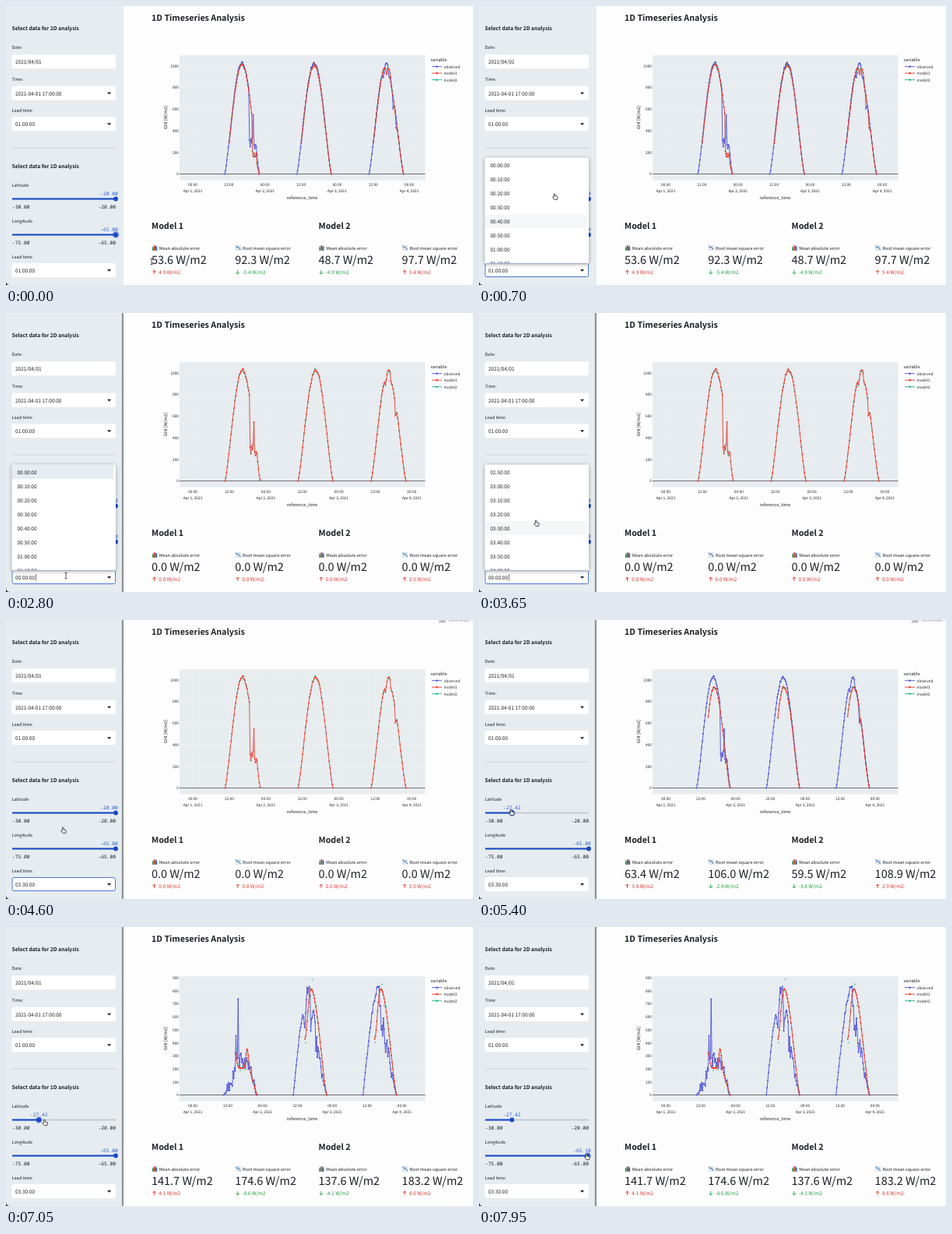
An HTML page with a canvas that plays this animation: 600 by 358 pixels, repeating every 8000 ms.

```html
<!DOCTYPE html>
<html lang="en">
<head>
<meta charset="utf-8">
<title>1D Timeseries Analysis</title>
<style>
html, body { margin: 0; width: 100%; height: 100%; overflow: hidden; background: #fdfdfd; }
canvas { display: block; width: 600px; height: 358px; }
</style>
</head>
<body>
<canvas></canvas>
<script>
const LOOP = 8000;
const INK = '#1c1e28', PANEL = '#e6ecef', BLUE = '#1848c8', PAGE = '#fdfdfd';
const RED = '#d9342a', GREEN = '#1d9e40';
const OBSERVED = '#4c51d8', MODEL1 = '#e8392b', MODEL2 = '#1fb18a';
const SANS = '"Noto Sans CJK JP", "Noto Sans CJK SC", "Noto Sans CJK", "Open Sans", sans-serif';
const MONO = '"Noto Sans Mono", "DejaVu Sans Mono", monospace';
const EM = 0.402; // page zoom, corrected for the font's larger latin glyphs

const canvas = document.querySelector('canvas');
const ctx = canvas.getContext('2d');
const ratio = window.devicePixelRatio || 1;
canvas.width = 600 * ratio;
canvas.height = 358 * ratio;
ctx.textRendering = 'geometricPrecision';

// ---------- drawing helpers ----------
function text(str, x, y, size = 14, { color = INK, align = 'left', weight = 400, mono = false } = {}) {
  ctx.font = `${weight} ${size * (mono ? 0.449 : EM)}px ${mono ? MONO : SANS}`;
  ctx.fillStyle = color;
  ctx.textAlign = align;
  ctx.fillText(str, x, y);
}
function rect(x, y, w, h, fill) {
  ctx.fillStyle = fill;
  ctx.fillRect(x, y, w, h);
}
function roundRect(x, y, w, h, r, fill) {
  ctx.beginPath();
  ctx.roundRect(x, y, w, h, r);
  ctx.fillStyle = fill;
  ctx.fill();
}
function circle(x, y, r, fill) {
  ctx.beginPath();
  ctx.arc(x, y, r, 0, 7);
  ctx.fillStyle = fill;
  ctx.fill();
}
function polyline(points, color, width = 0.9) {
  ctx.beginPath();
  points.forEach(([x, y]) => ctx.lineTo(x, y));
  ctx.strokeStyle = color;
  ctx.lineWidth = width;
  ctx.lineJoin = 'round';
  ctx.stroke();
}
const clamp01 = p => Math.min(1, Math.max(0, p));

// ---------- irradiance by day (0 to 2) and hour ----------
const SUNRISE = 10.6, DAY = 11.5, STEP = 0.25;

const sun = h => Math.sin(Math.PI * clamp01((h - SUNRISE) / DAY));
const bump = (h, center, width) => Math.exp(-(((h - center) / width) ** 2));
// Seeded noise between -0.5 and 0.5, one value per time step.
function noise(day, h) {
  const s = Math.sin((Math.round(h / STEP) + day * 99) * 127.1) * 43758.5;
  return s - Math.floor(s) - 0.5;
}

const clearSky = h => 1022 * sun(h) ** 1.3;

function sunnyObserved(day, h) {
  const n = noise(day, h);
  if (day === 0 && h > 18.7) {
    const broken = 275 + 160 * n + 200 * bump(h, 20.1, 0.15);
    return Math.min(broken, 1.3 * clearSky(h) + 10);
  }
  let factor = 1 + 0.025 * n;
  if (day === 2) {
    factor -= 0.09 * bump(h, 15.4, 0.5) * (0.6 + n) + 0.25 * bump(h, 18.7, 0.15);
    if (h > 17) factor -= 0.07;
  }
  return clearSky(h) * factor;
}

// Persistence forecast: the clearness seen one lead time earlier.
const forecast = lead => (day, h) => {
  if (!lead) return sunnyObserved(day, h);
  const clearness = Math.min(1.05, sunnyObserved(day, h - lead) / Math.max(1, clearSky(h - lead)));
  const spinUp = 0.06 * lead * Math.exp((SUNRISE + lead + 0.5 - h) / 1.2);
  return clearSky(h) * clearness * (1 - spinUp - 0.013 * lead);
};

function cloudyObserved(day, h) {
  const n = noise(day, h);
  if (day === 0) {
    const flashes = 260 * bump(h, 14.85, 0.15) + 500 * bump(h, 15.6, 0.15);
    return (270 * bump(h, 17.2, 4) + 120 * n + flashes) * clamp01(clearSky(h) / 250);
  }
  const gaps = h > 16.1 ? (0.8 + 0.45 * n) * (1 - 0.1 * (h - 16)) : 0.99 + 0.08 * n;
  const dip = day === 1 ? 0.28 * bump(h, 14.5, 0.4) : 0;
  return 835 * sun(h) * (gaps - dip);
}

function cloudyModel(day, h) {
  if (day === 0)
    return (205 + 120 * bump(h, 14.6, 0.7) + 150 * bump(h, 18.7, 0.6)) * clamp01((22 - h) / 2.6);
  return 830 * sun(h) ** 1.3 * (1 - 0.4 * bump(h, 14.7, 1.1));
}

function result(lead, hourWidth, metrics, cloudy = false) {
  return {
    hourWidth, metrics,
    hideObserved: lead === 0,
    start: lead ? SUNRISE + lead + 0.5 : SUNRISE,
    unit: cloudy ? 0.1672 : 0.1389,
    tick: cloudy ? 100 : 200,
    ticks: cloudy ? 9 : 5,
    observed: cloudy ? cloudyObserved : sunnyObserved,
    model: cloudy ? cloudyModel : forecast(lead),
    spread: cloudy ? 0.3 : 0.03
  };
}
const RESULTS = [
  [0, result(1, 3.8625, [[53.6, 4.9], [92.3, -5.4], [48.7, -4.9], [97.7, 5.4]])],
  [2300, result(0, 3.908, [[0, 0], [0, 0], [0, 0], [0, 0]])],
  [5000, result(3.5, 3.733, [[63.4, 3.8], [106, -2.9], [59.5, -3.8], [108.9, 2.9]])],
  [6950, result(3.5, 3.733, [[141.7, 4.1], [174.6, -8.6], [137.6, -4.1], [183.2, 8.6]], true)]
];
const RUNS = [[1000, 2300], [3950, 5000], [5250, 6950]];

// ---------- main column ----------
function drawChart(r) {
  const X0 = 240, Y0 = 215.5, TOP = 63.3, HEIGHT = 160.2;
  const toX = (day, h) => X0 + (day * 24 + h) * r.hourWidth;
  const toY = value => Y0 - Math.max(0, value) * r.unit;

  rect(223, TOP, 315.5, HEIGHT, PANEL);
  for (let i = 0; i <= r.ticks; i++) {
    const y = toY(i * r.tick);
    rect(223, y - 0.25, 315.5, 0.5, '#eee');
    text(i * r.tick, 222, y + 1.9, 12, { align: 'right' });
  }
  for (let i = 0; i < 7; i++) {
    const x = toX(0, i * 12);
    rect(x - 0.25, TOP, 0.5, HEIGHT, '#eee');
    text(i % 2 ? '12:00' : '00:00', x, 230.8, 12, { align: 'center' });
    if (i % 2 === 0) text(`Apr ${i / 2 + 1}, 2021`, x, 238.7, 12, { align: 'center' });
  }
  rect(223, Y0 - 0.4, 315.5, 0.8, '#5a4a55');

  const plot = (value, start, color) => {
    for (let day = 0; day < 3; day++) {
      const points = [];
      for (let h = start; h < 22.2; h += STEP) points.push([toX(day, h), toY(value(day, h))]);
      polyline(points, color);
      points.forEach(([x, y]) => circle(x, y, 1, color));
    }
  };
  if (!r.hideObserved) plot(r.observed, SUNRISE, OBSERVED);
  plot(r.model, r.start, MODEL1);
  for (let day = 0; day < 3; day++)
    for (let h = r.start + STEP; h < 22; h += 3 * STEP)
      circle(toX(day, h), toY(r.model(day, h) * (1 + r.spread * noise(day, h + 50))), 0.8, MODEL2);

  text('reference_time', 380.5, 247.5, 14, { align: 'center' });
  ctx.save();
  ctx.translate(206.5, 143);
  ctx.rotate(-Math.PI / 2);
  text('GHI [W/m2]', 0, 0, 14, { align: 'center' });
  ctx.restore();

  text('variable', 545.5, 71.3, 14);
  [['observed', OBSERVED], ['model1', MODEL1], ['model2', MODEL2]].forEach(([name, color], i) => {
    const y = 77.7 + i * 8.5;
    polyline([[547, y], [560, y]], color);
    circle(553.5, y, 1.2, color);
    text(name, 562.5, y + 1.9, 12);
  });
}

function drawIcon(x, falling) {
  rect(x, 306.8, 7, 7, '#dbe5ec');
  if (falling) {
    polyline([[x + 0.5, 307.5], [x + 2.3, 310], [x + 3.6, 309], [x + 6.7, 313]], '#2f6fb5', 1);
    return;
  }
  rect(x + 0.5, 309.3, 1.8, 4.5, '#2f9141');
  rect(x + 2.6, 307.3, 1.8, 6.5, '#d0352b');
  rect(x + 4.7, 308.5, 1.8, 5.3, '#1f5fb5');
}

function drawMetric(x, [value, delta], isRms) {
  drawIcon(x + 0.5, isRms);
  text(isRms ? 'Root mean square error' : 'Mean absolute error', x + 9.8, 312.7);
  text(`${value.toFixed(1)} W/m2`, x, 331.2, 36);
  const color = delta < 0 ? GREEN : RED;
  const dir = delta < 0 ? 1 : -1, tip = 341.5 + dir * 2.5;
  polyline([[x + 3.5, 341.5 - dir * 2.5], [x + 3.5, tip]], color);
  polyline([[x + 1.2, tip - dir * 2.3], [x + 3.5, tip], [x + 5.8, tip - dir * 2.3]], color);
  text(`${delta.toFixed(1)} W/m2`, x + 9.3, 344, 16, { color });
}

function drawRunning(t) {
  for (let i = 0; i < 3; i++) {
    const shift = Math.sin(t / 120 + i);
    polyline([[555.5 + shift, i * 1.6 - 0.3], [564 + shift, i * 1.6 - 0.3]], '#777', 0.7);
  }
  text('RUNNING...', 569, 2, 14, { color: '#8a8c93' });
}

function drawMain(t) {
  const [, current] = RESULTS.filter(([at]) => at <= t).pop();
  const heading = (str, x, y) => text(str, x, y, 26.7, { weight: 600 });
  rect(151, 0, 449, 358, PAGE);
  heading('1D Timeseries Analysis', 187, 18.6);
  drawChart(current);
  heading('Model 1', 187, 286);
  heading('Model 2', 401.5, 286);
  current.metrics.forEach((m, i) => drawMetric(187 + i * 107.2, m, i % 2 === 1));

  const run = RUNS.find(([from, to]) => t >= from && t < to);
  if (!run) return;
  // Stale content fades out after half a second.
  ctx.globalAlpha = 0.67 * clamp01((t - run[0] - 500) / 1000) ** 1.7;
  rect(151, 0, 449, 358, PAGE);
  ctx.globalAlpha = 1;
  if (t > run[0] + 100) drawRunning(t);
}

// ---------- sidebar ----------
function drawField(y, value, { arrow = true, focus = false } = {}) {
  roundRect(7.5, y, 133.5, 18, 2, '#fff');
  if (focus) {
    ctx.beginPath();
    ctx.roundRect(8, y + 0.5, 132.5, 17, 2);
    ctx.strokeStyle = '#4a78cf';
    ctx.lineWidth = 1;
    ctx.stroke();
  }
  text(value, 12, y + 11.9, 16);
  if (!arrow) return;
  ctx.beginPath();
  ctx.moveTo(130, y + 8);
  ctx.lineTo(135.2, y + 8);
  ctx.lineTo(132.6, y + 10.8);
  ctx.fillStyle = INK;
  ctx.fill();
}

function drawSlider(y, label, min, max, value, active) {
  const x = 8 + 133 * (value - min) / (max - min);
  text(label, 7.5, y - 15.3);
  rect(8, y - 1, 133, 2, '#c3cdd6');
  rect(8, y - 1, x - 8, 2, BLUE);
  if (active) circle(x, y, 4.3, 'rgba(24,72,200,.45)');
  circle(x, y, 2.9, BLUE);
  const mono = { mono: true };
  text(value.toFixed(2), Math.min(x, 132.5), y - 5, 14, { ...mono, color: '#2a5ccb', align: 'center' });
  text(min.toFixed(2), 8, y + 12.8, 14, mono);
  text(max.toFixed(2), 141, y + 12.8, 14, { ...mono, align: 'right' });
}

const leadLabel = i => `0${Math.floor(i / 6)}:${i % 6}0:00`;

function drawMenu(t, scroll) {
  ctx.save();
  ctx.shadowColor = 'rgba(0,0,0,.35)';
  ctx.shadowBlur = 5;
  ctx.shadowOffsetY = 1;
  roundRect(7.5, 194.5, 133.5, 136, 2, '#fff');
  ctx.restore();
  ctx.save();
  ctx.beginPath();
  ctx.rect(7.5, 194.5, 133.5, 135.5);
  ctx.clip();
  const { y } = pointerAt(t - 110);
  const hover = y > 195 && y < 330 ? Math.floor((y - 195 + scroll) / 18) : -1;
  for (let i = 0; i < 30; i++) {
    const top = 195 + i * 18 - scroll;
    if (i === hover) rect(7.5, top, 131, 18, '#f4f6f7');
    if (i === 0 && t > 2000) rect(7.5, top, 131, 18, PANEL);
    text(leadLabel(i), 14.5, top + 11.6, 16);
  }
  ctx.restore();
}

function drawSidebar(t) {
  const heading = (str, y) => text(str, 7.5, y, 16.7, { weight: 600 });
  rect(0, 0, 151, 358, PANEL);
  if (t >= 1000) rect(148.8, 0, 2.2, 358, '#8f9399');
  heading('Select data for 2D analysis', 31.2);
  text('Date:', 7.5, 55.2);
  drawField(62.3, '2021/04/01', { arrow: false });
  text('Time:', 7.5, 96);
  drawField(102.7, '2021-04-01 17:00:00');
  text('Lead time:', 7.5, 135.5);
  drawField(142.2, '01:00:00');
  rect(8, 181.6, 133, 0.8, '#c9cfd5');
  heading('Select data for 1D analysis', 207.8);
  drawSlider(247.5, 'Latitude', -30, -20, t < 5200 ? -20 : -27.42, t >= 5150 && t < 7100);
  drawSlider(293.5, 'Longitude', -75, -65, t < 7750 ? -65 : -65.1, t < 250 || t >= 7600);
  text('Lead time:', 7.5, 323.5);
  const lead = t < 1000 ? 6 : t < 3950 ? 0 : 21;
  drawField(330, leadLabel(lead), { focus: t >= 300 && t < 5200 });

  const firstOpen = t >= 350 && t < 1000, secondOpen = t >= 2700 && t < 3950;
  if (!firstOpen && !secondOpen) return;
  if (secondOpen && t % 1000 > 500) rect(38.2, 335, 0.6, 8.5, INK);
  const p = clamp01((t - 3100) / 600);
  drawMenu(t, 312 * p * p * (3 - 2 * p));
}

// ---------- pointer: stops as arrival, departure, place and shape ----------
const STOPS = [
  [0, 50, 187, 328, 'beam'],
  [350, 350, 77, 339, 'beam'],
  [700, 700, 98, 245, 'hand'],
  [920, 1020, 60, 205, 'hand'],
  [1650, 2200, 85, 304, 'arrow'],
  [2600, 2850, 77, 337, 'beam'],
  [3080, 4650, 74, 270, 'hand'],
  [5150, 7000, 42, 247, 'hand'],
  [7600, LOOP, 139, 295, 'hand']
];
function pointerAt(t) {
  const i = STOPS.findIndex(([, leave]) => leave > t);
  const [arrive, , x, y, kind] = STOPS[i];
  if (i === 0 || t >= arrive) return { x, y, kind };
  const [, left, x0, y0] = STOPS[i - 1];
  const p = (t - left) / (arrive - left);
  return { x: x0 + (x - x0) * p, y: y0 + (y - y0) * p, kind };
}
const SHAPES = {
  arrow: new Path2D('M0 0V7L1.7 5.5 2.8 7.8 3.9 7.3 2.9 5H5Z'),
  hand: new Path2D('M-1.6 .2V-3.2a.8 .8 0 0 1 1.6 0V-1L2.6-.5Q3.5-.2 3.3 .8L2.6 3.6H-1L-3.2 .8Q-3.2-.3-1.6 .2Z'),
  beam: new Path2D('M-1.6-4Q0-4 0-3Q0-4 1.6-4M0-3V3M-1.6 4Q0 4 0 3Q0 4 1.6 4')
};

function drawPointer(t) {
  const { x, y, kind } = pointerAt(t);
  ctx.save();
  ctx.translate(x, y);
  ctx.lineWidth = 0.8;
  ctx.strokeStyle = kind === 'arrow' ? '#fff' : '#222';
  ctx.fillStyle = kind === 'arrow' ? '#111' : '#fff';
  if (kind !== 'beam') ctx.fill(SHAPES[kind]);
  ctx.stroke(SHAPES[kind]);
  ctx.restore();
}

function drawCorner() {
  ctx.beginPath();
  ctx.moveTo(0, 353.5);
  ctx.quadraticCurveTo(0.5, 357.5, 4.5, 358);
  ctx.lineTo(0, 358);
  ctx.fillStyle = '#222';
  ctx.fill();
}

const began = performance.now();
function frame() {
  const t = (performance.now() - began) % LOOP;
  ctx.setTransform(ratio, 0, 0, ratio, 0, 0);
  drawMain(t);
  drawSidebar(t);
  drawCorner();
  drawPointer(t);
  requestAnimationFrame(frame);
}
frame();
</script>
</body>
</html>
```
